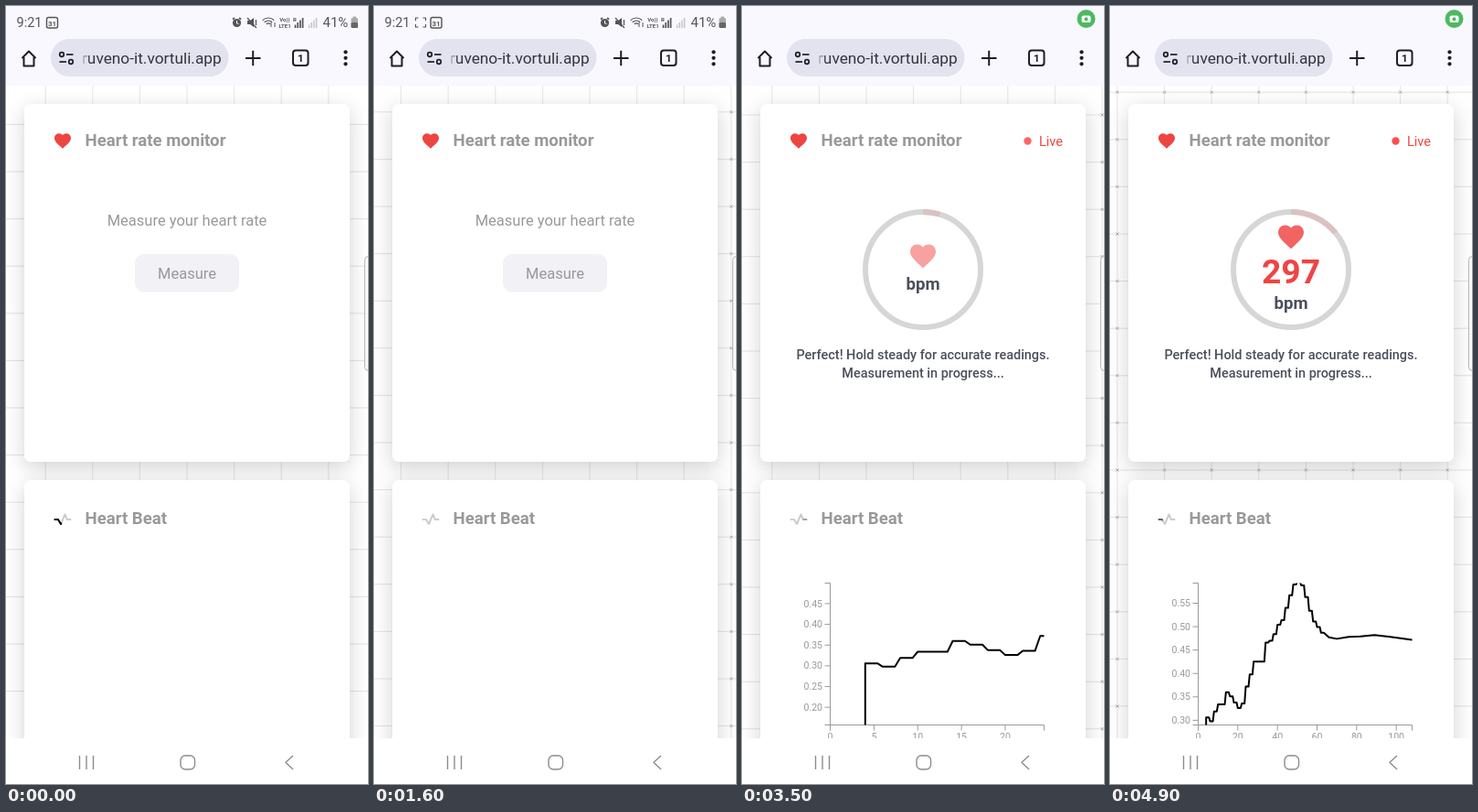
These frames come from a looping animation (396 px wide and 850 px high, 5000 ms). An HTML page with a canvas:

```html
<!DOCTYPE html>
<html lang="en">
<head>
<meta charset="utf-8">
<title>Heart rate monitor</title>
<style>
  html, body { margin: 0; width: 100%; height: 100%; overflow: hidden; background: #fff; }
  canvas { display: block; }
</style>
</head>
<body>
<canvas id="stage" width="396" height="850"></canvas>
<script>
const c = document.getElementById('stage').getContext('2d');
const LOOP = 5000, STEP = 100, PITCH = 51.6;
const RED = '#ef4444', GREY = '#999', INK = '#1d1d24', DARK = '#4b4f5c', STATUS = '#555';
const HEART = new Path2D('M12 21.35l-1.45-1.32C5.4 15.36 2 12.28 2 8.5 2 5.42 4.42 3 7.5 3c1.74 0 3.41.81 4.5 2.09C13.09 3.81 14.76 3 16.5 3 19.58 3 22 5.42 22 8.5c0 3.78-3.4 6.86-8.55 11.54L12 21.35z');
const PULSE = new Path2D('M53.5 561H57L60 566L64.5 555.5L67 561H70.5');

// Signal: stepped samples two units apart, then a smooth tail
const steps = [.306, .298, .319, .334, .334, .36, .351, .338, .326, .336, .372, .398, .4255, .4255, .4255,
  .466, .47, .484, .504, .514, .54, .567, .59, .596, .588, .563, .534, .511, .499, .487];
const signal = [[4, 0]];
steps.forEach((v, i) => signal.push([4 + 2 * i, v], [5.4 + 2 * i, v]));
signal.push([66, .477], [70, .474], [76, .478], [82, .479], [89, .482], [97, .478], [108, .472], [115, .47]);

function track(t, keys) {
  if (t <= keys[0][0]) return keys[0][1];
  for (let i = 1; i < keys.length; i++) {
    const [a, u] = keys[i - 1], [b, v] = keys[i];
    if (t <= b) return u + (v - u) * (t - a) / (b - a);
  }
  return keys[keys.length - 1][1];
}

const breathe = (t, start) => .75 + .25 * Math.cos(Math.PI * (t - start) / 1000);

function text(s, x, y, size, color, weight = 400, align = 'left') {
  c.font = `${weight} ${size}px Roboto, sans-serif`;
  c.textAlign = align;
  c.fillStyle = color;
  c.fillText(s, x, y);
}

function line(points, color, width = 1, cap = 'butt') {
  c.beginPath();
  points.forEach(([x, y]) => c.lineTo(x, y));
  c.strokeStyle = color;
  c.lineWidth = width;
  c.lineCap = cap;
  c.lineJoin = 'round';
  c.stroke();
}

function box(x, y, w, h, r, fill, stroke, width = 1) {
  c.beginPath();
  c.roundRect(x, y, w, h, r);
  if (fill) { c.fillStyle = fill; c.fill(); }
  if (stroke) { c.strokeStyle = stroke; c.lineWidth = width; c.stroke(); }
}

function disc(x, y, r, color) {
  c.beginPath();
  c.arc(x, y, r, 0, 7);
  c.fillStyle = color;
  c.fill();
}

function arc(x, y, r, from, to, color, width) {
  c.beginPath();
  c.arc(x, y, r, from, to);
  c.strokeStyle = color;
  c.lineWidth = width;
  c.lineCap = 'butt';
  c.stroke();
}

function heart(x, y, scale, alpha = 1) {
  c.save();
  c.translate(x, y);
  c.scale(scale, scale);
  c.translate(-12, -12.2);
  c.globalAlpha = alpha;
  c.fillStyle = RED;
  c.fill(HEART);
  c.restore();
}

function grid(t) {
  const shift = 43.2 + t * .056;
  const x0 = shift % PITCH - PITCH, y0 = 34.6 + shift % PITCH;
  for (let x = x0; x < 400; x += PITCH) line([[x, 87], [x, 800]], '#e6e6e6');
  for (let y = y0; y < 800; y += PITCH) line([[0, y], [396, y]], '#e3e3e3');
  for (let x = x0; x < 400; x += PITCH)
    for (let y = y0; y < 800; y += PITCH) {
      line([[x - 1.5, y - 1.5], [x + 1.5, y + 1.5]], '#aaa');
      line([[x - 1.5, y + 1.5], [x + 1.5, y - 1.5]], '#aaa');
    }
}

function card(y, h) {
  c.save();
  c.shadowColor = 'rgba(0,0,0,.18)';
  c.shadowBlur = 22;
  c.shadowOffsetY = 6;
  box(20, y, 356, h, 7, '#fff');
  c.restore();
}

function pulseIcon(t) {
  const p = (t + 200) % 1000 / 1000 - .2;
  c.lineWidth = 2;
  c.lineJoin = c.lineCap = 'round';
  c.strokeStyle = '#ccc';
  c.stroke(PULSE);
  const head = 10 + 60 * p, tail = Math.max(0, head - 13);
  const alpha = track(p, [[-.2, 0], [0, 1], [.3, 1], [.55, 0]]);
  if (alpha <= 0 || head <= 0) return;
  c.save();
  c.globalAlpha = alpha;
  c.strokeStyle = '#000';
  c.setLineDash([head - tail, 200]);
  c.lineDashOffset = -tail;
  c.stroke(PULSE);
  c.restore();
}

function measuring(t) {
  const count = t >= 4700 ? '297' : t >= 3700 && t < 4300 ? '86' : '';
  const live = t >= 3100, move = count ? 21 : 0;
  arc(198, 288, 63, 0, 7, '#d6d6d6', 6);
  if (live) {
    const turn = (t - 2800) * .024 * Math.PI / 180;
    arc(198, 288, 63, -Math.PI / 2, turn - Math.PI / 2, '#dcc1c1', 6);
  }
  heart(198, 273.5 - move, 1.4, breathe(t, 2500));
  if (count) text(count, 198, 303, 37.2, RED, 700, 'center');
  text('bpm', 198, 310 + move, 18.6, DARK, 700, 'center');
  const note = 'Measurement in progress...';
  if (!live) return text(note, 198, 385.5, 14.45, DARK, 500, 'center');
  text('Perfect! Hold steady for accurate readings.', 198, 385.5, 14.45, DARK, 500, 'center');
  text(note, 198, 406, 14.45, DARK, 500, 'center');
  c.globalAlpha = breathe(t, 3100);
  disc(312.5, 147.5, 4.2, '#ff4545');
  c.globalAlpha = 1;
  text('Live', 325, 152.5, 14.45, RED);
}

function tickStep(span) {
  const raw = span / 5, power = 10 ** Math.floor(Math.log10(raw)), e = raw / power;
  return power * (e >= 7.07 ? 10 : e >= 3.16 ? 5 : e >= 1.414 ? 2 : 1);
}

function chart(t) {
  const left = 96.5, right = 330.5, top = 630.5, base = 785.5;
  const n = track(t, [[3100, 0], [4000, 55], [4500, 81], [4900, 108]]);
  const lo = track(t, [[3200, .1], [4000, .253], [4500, .28], [4900, .29]]);
  const hi = track(t, [[3200, .45], [4000, .582], [4500, .595], [4900, .593]]);
  const px = u => left + u / n * (right - left);
  const py = v => base - (v - lo) / (hi - lo) * (base - top);
  line([[left - 6, top], [left, top], [left, base], [left - 6, base]], GREY);
  line([[left, base + 6], [left, base], [right, base], [right, base + 6]], GREY);
  const dy = tickStep(hi - lo), dx = tickStep(n);
  for (let i = Math.ceil(lo / dy); i * dy <= hi; i++) {
    const y = py(i * dy);
    line([[left - 6, y], [left, y]], GREY);
    text((i * dy).toFixed(2), 88, y + 3.6, 10.5, GREY, 400, 'right');
  }
  for (let u = 0; u <= n; u += dx) {
    line([[px(u), base], [px(u), base + 6]], GREY);
    text(u, px(u), 802, 10.5, GREY, 400, 'center');
  }
  c.save();
  c.beginPath();
  c.rect(left, top, right - left, base - top);
  c.clip();
  line(signal.map(([u, v]) => [px(u), py(v)]), '#000', 2);
  c.restore();
}

function page(t) {
  c.save();
  c.beginPath();
  c.rect(0, 87, 396, 713);
  c.clip();
  grid(t);
  card(107, 391);
  card(518, 400);
  heart(62, 147.5, .9);
  text('Heart rate monitor', 86.5, 153, 18.58, GREY, 600);
  text('Heart Beat', 86.5, 566, 18.58, GREY, 600);
  pulseIcon(t);
  if (t < 2500) {
    text('Measure your heart rate', 198, 239.5, 16.5, GREY, 400, 'center');
    box(141, 271, 114, 41.5, 10, '#f1f1f6');
    text('Measure', 198, 298, 16.5, GREY, 400, 'center');
  } else measuring(t);
  if (t >= 3300) chart(t);
  c.restore();
}

function statusBar(t) {
  if (t >= 3200) {
    disc(376.5, 14, 10, '#4dba5f');
    box(371.5, 10.5, 10, 7.5, 2, '#fff');
    disc(376.5, 14.2, 2, '#4dba5f');
    return;
  }
  text('9:21', 11.5, 23, 14.5, STATUS);
  let x = 44.5;
  if (t >= 400) {
    for (const sx of [-1, 1]) for (const sy of [-1, 1])
      line([[51 + sx * 2.5, 18 + sy * 5], [51 + sx * 5.5, 18 + sy * 5], [51 + sx * 5.5, 18 + sy * 2]], STATUS, 1.2);
    if ((t + 200) % 1200 < 600) arc(51, 18, 2, 0, 7, STATUS, 1.2);
    x = 62;
  }
  box(x, 12.5, 12, 11.5, 2, null, STATUS, 1.4);
  text('31', x + 6, 21.5, 8, STATUS, 700, 'center');

  disc(252.5, 18.5, 4.6, STATUS);
  line([[248, 14.5], [250, 13]], STATUS, 1.6);
  line([[257, 14.5], [255, 13]], STATUS, 1.6);
  line([[252.5, 16], [252.5, 19], [254.5, 19.5]], '#fff');
  c.beginPath();
  [[264, 16], [267, 16], [271, 13], [271, 23], [267, 20], [264, 20]].forEach(p => c.lineTo(...p));
  c.fill();
  line([[264, 13], [274, 24]], STATUS, 1.2);
  line([[273.5, 15], [273.5, 21]], STATUS, 1.2);
  for (const r of [3, 6, 9]) arc(287, 22, r, -2.35, -.8, STATUS, 1.2);
  line([[290, 23], [290, 18]], STATUS);
  line([[294, 18], [294, 23]], STATUS);
  text('Vo))', 305, 17, 6, STATUS, 700, 'center');
  text('LTE1', 305, 24, 6, STATUS, 700, 'center');
  text('R', 314, 17, 6, STATUS, 700);
  for (let i = 0; i < 4; i++) {
    line([[316.5 + i * 2.7, 24], [316.5 + i * 2.7, 20.5 - i * 2.5]], STATUS, 1.7);
    line([[331.5 + i * 2.7, 24], [331.5 + i * 2.7, 20.5 - i * 2.5]], '#c4c4ca', 1.5);
  }
  text('41%', 346.5, 23, 15, STATUS);
  box(377.5, 13, 7.5, 11, 1.5, '#aaa');
  box(377.5, 18, 7.5, 6, 1.5, '#666');
  box(379.5, 11.5, 3.5, 2, 0, '#aaa');
}

function toolbar() {
  line([[17.5, 57], [25, 49.5], [32.5, 57]], INK, 2);
  line([[19.5, 56], [19.5, 65.5], [30.5, 65.5], [30.5, 56]], INK, 2);
  box(49, 36, 194.5, 41, 20.5, '#e3e3f0');
  arc(61, 53, 2.3, 0, 7, INK, 1.7);
  line([[66, 53], [73.5, 53]], INK, 1.7);
  arc(71, 61, 2.3, 0, 7, INK, 1.7);
  line([[58.5, 61], [66, 61]], INK, 1.7);
  text('ruveno-it.vortuli.app', 83, 62.5, 17.3, '#34343c');
  const fade = c.createLinearGradient(82, 0, 92, 0);
  fade.addColorStop(0, '#e3e3f0');
  fade.addColorStop(1, 'rgba(227,227,240,0)');
  c.fillStyle = fade;
  c.fillRect(82, 46, 10, 22);
  line([[262, 57], [278.5, 57]], INK, 2);
  line([[270.2, 48.8], [270.2, 65.2]], INK, 2);
  box(314, 48.5, 16.5, 16.5, 3, null, INK, 2);
  text('1', 322.2, 61, 11.5, INK, 700, 'center');
  for (const y of [50.3, 56.8, 63.3]) disc(371.5, y, 2.1, INK);
}

function navigation() {
  c.fillStyle = '#fff';
  c.fillRect(0, 800, 396, 50);
  for (const x of [80.5, 88, 95.5]) line([[x, 819], [x, 834]], '#8c8c8c', 1.4);
  box(191, 819, 15.5, 15, 5, null, '#8c8c8c', 1.4);
  line([[314, 819], [306, 826.5], [314, 834]], '#8c8c8c', 1.4);
}

function draw(now) {
  const t = Math.floor(now % LOOP / STEP) * STEP;
  c.fillStyle = '#fff';
  c.fillRect(0, 0, 396, 850);
  page(t);
  c.fillStyle = '#f8f8fe';
  c.fillRect(0, 0, 396, 87);
  statusBar(t);
  toolbar();
  navigation();
  box(392.5, 273.5, 10, 125, 4, '#fafafa', '#b5b5b5');
  requestAnimationFrame(draw);
}
requestAnimationFrame(draw);
</script>
</body>
</html>
```
